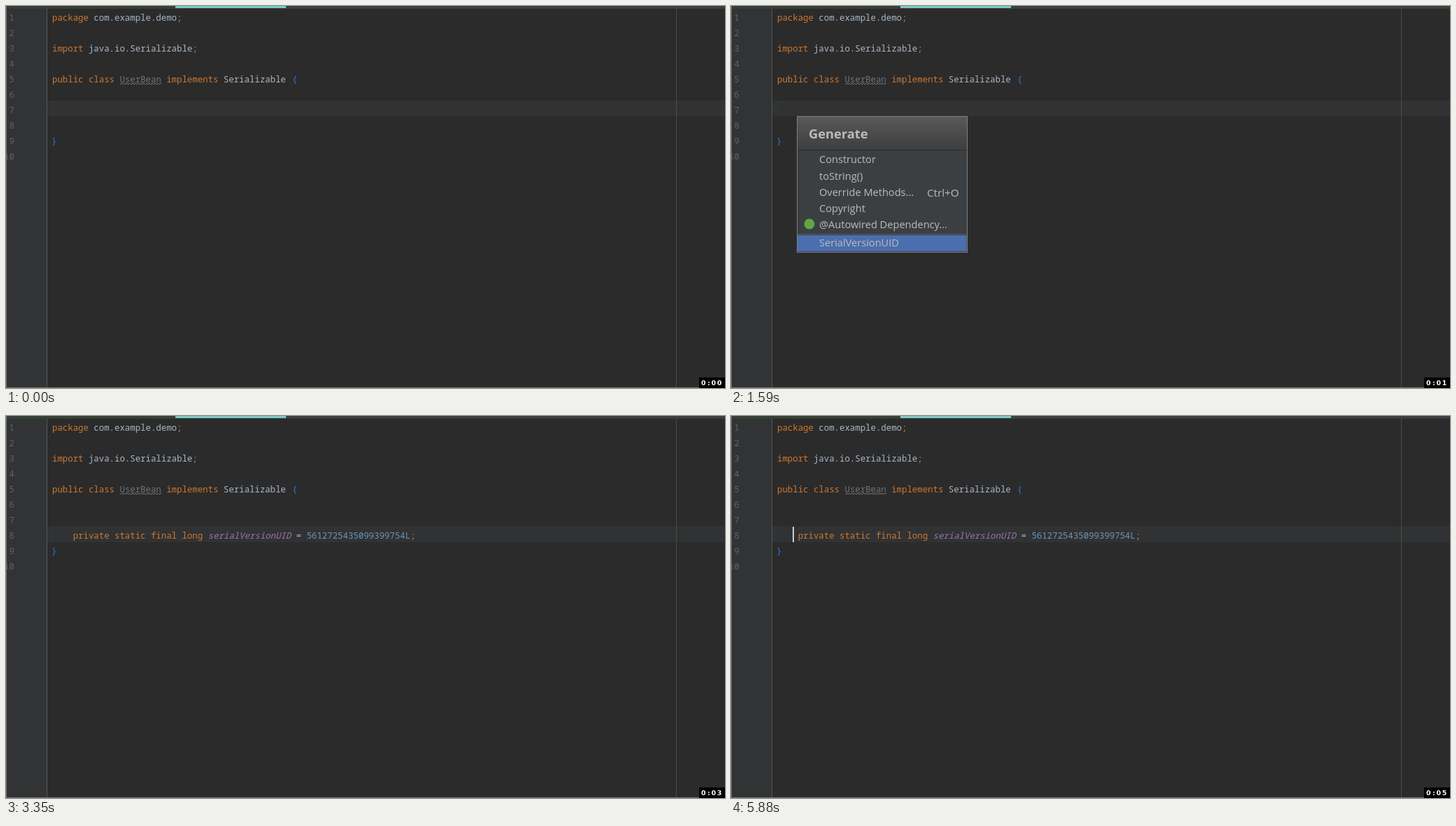
An HTML page that plays this animation: 1027x545 px, repeating every 5940 ms.

```html
<!DOCTYPE html>
<html lang="en">
<head>
<meta charset="utf-8">
<title>Generate a serial ID</title>
<style>
  html, body { margin: 0; width: 100%; height: 100%; overflow: hidden; background: #2b2b2b; }
  svg { display: block; }

  .code text { font: 300 12.36px "Noto Sans Mono", "Liberation Mono", monospace; white-space: pre; fill: #a9b7c6; }
  .code .nums text { fill: #606366; text-anchor: end; }
  .code .key { fill: #cc7832; }
  .code .num { fill: #6897bb; }
  .code .brace { fill: #287bde; }
  .code .unused { fill: #72737a; }
  .code .field { fill: #9876aa; font-style: italic; }

  .menu text { font: 14.6px "Open Sans", "Noto Sans", sans-serif; fill: #bbb; }
  .menu .title { font-weight: 700; font-size: 18.3px; }
  .menu .keys { font-size: 15.2px; }
  .clock text { font: 700 9.4px "DejaVu Sans", sans-serif; fill: #fff; }

  .anim { animation: 5940ms step-end infinite; }
  .before { animation-name: before; }
  .after { animation-name: after; }
  .plain { animation-name: plain; }
  .styled { animation-name: styled; }
  .caret7 { animation-name: caret7; }
  .caret8 { animation-name: caret8; }
  .popup { animation-name: popup; }
  .pick { animation-name: pick; }
  .seconds { animation-name: seconds; }
  .pointer { animation-name: pointer, glide; }

  @keyframes before { 0% { visibility: visible } 39.730%, 100% { visibility: hidden } }
  @keyframes after { 0% { visibility: hidden } 39.730%, 100% { visibility: visible } }
  @keyframes plain { 0%, 44.949%, 100% { visibility: hidden } 39.730% { visibility: visible } }
  @keyframes styled { 0% { visibility: hidden } 44.949%, 100% { visibility: visible } }
  @keyframes caret7 { 0%, 14.141%, 100% { visibility: hidden } 5.218% { visibility: visible } }
  @keyframes caret8 {
    0%, 56.397%, 75.084%, 91.750% { visibility: hidden }
    39.730%, 65.656%, 82.996%, 98.989%, 100% { visibility: visible }
  }
  @keyframes popup { 0%, 39.730%, 100% { visibility: hidden } 15.656% { visibility: visible } }
  @keyframes pick { 0% { transform: none } 26.767%, 100% { transform: translateY(119px) } }
  @keyframes seconds {
    0% { transform: none }
    17.340% { transform: translateY(-20px) }
    34.175% { transform: translateY(-40px) }
    50.673% { transform: translateY(-60px) }
    68.350% { transform: translateY(-80px) }
    86.026%, 100% { transform: translateY(-100px) }
  }
  @keyframes pointer { 0%, 76.599%, 100% { visibility: hidden } 65.656% { visibility: visible } }
  @keyframes glide {
    0% { transform: translate(540px, 58px) }
    65.656% { transform: translate(540px, 58px); animation-timing-function: steps(6) }
    73.737% { transform: translate(848px, 459px) }
    75.084%, 100% { transform: translate(895px, 520px) }
  }
</style>
</head>
<body>
<svg width="1027" height="545" viewBox="0 0 1027 545">
  <defs>
    <linearGradient id="head" x2="0" y2="1">
      <stop stop-color="#595959"/>
      <stop offset="1" stop-color="#3d3e3f"/>
    </linearGradient>
    <pattern id="wave" x="163" y="109" width="4" height="4" patternUnits="userSpaceOnUse">
      <path d="M-1 3.5L0 3L2 1L4 3L5 3.5" fill="none" stroke="#808080" stroke-width=".9"/>
    </pattern>
  </defs>

  <!-- editor -->
  <rect width="1027" height="545" fill="#2b2b2b"/>
  <rect width="58" height="545" fill="#313335"/>
  <rect class="anim before" x="59" y="135" width="968" height="22" fill="#313233"/>
  <rect class="anim before" x="66" y="135" width="1" height="22" fill="#393939"/>
  <rect class="anim after" x="59" y="157" width="968" height="23" fill="#313233"/>
  <rect x="58" width="1" height="545" fill="#555758"/>
  <rect x="957" width="1" height="545" fill="#4b4b4b"/>
  <rect width="1027" height="4" fill="#3c3f41"/>
  <rect width="242" height="4" fill="#364036"/>
  <rect x="242" width="158" height="3" fill="#7ccbc2"/>
  <rect width="1" height="545" fill="#777"/>
  <rect y="544" width="1027" height="1" fill="#777"/>

  <g class="code">
    <g class="nums" id="nums"></g>
    <text x="66" y="21"><tspan class="key">package</tspan> com.example.demo<tspan class="key">;</tspan></text>
    <text x="66" y="65"><tspan class="key">import</tspan> java.io.Serializable<tspan class="key">;</tspan></text>
    <text x="66" y="109"><tspan class="key">public class</tspan> <tspan class="unused">UserBean</tspan> <tspan class="key">implements</tspan> Serializable <tspan class="brace" dx="1.5">{</tspan></text>
    <rect x="163" y="109" width="59" height="4" fill="url(#wave)"/>
    <g class="anim after">
      <text x="66" y="175">    <tspan class="key">private static final long</tspan></text>
      <text x="66" y="175">                                               = <tspan class="num">5612725435099399754L</tspan><tspan class="key">;</tspan></text>
    </g>
    <text class="anim plain" x="288.5" y="175">serialVersionUID</text>
    <text class="anim styled field" x="288.5" y="175">serialVersionUID</text>
    <text x="65" y="196.5"><tspan class="brace">}</tspan></text>
  </g>

  <rect class="anim caret7" x="95" y="135" width="2" height="23" fill="#ccc"/>
  <rect class="anim caret8" x="88" y="158" width="2" height="22" fill="#ccc"/>

  <!-- popup menu -->
  <g class="menu anim popup">
    <rect x="94.5" y="157.5" width="243" height="194" fill="#3c3f41" stroke="#7b7d7f"/>
    <rect x="95" y="158" width="242" height="47" fill="url(#head)"/>
    <rect x="95" y="205" width="242" height="1" fill="#2a2b2c"/>
    <rect x="95" y="325" width="242" height="1" fill="#55585a"/>
    <rect class="anim pick" x="95" y="208" width="241.5" height="23" fill="#4b6eaf"/>
    <circle cx="112" cy="311" r="7.5" fill="#5fa83f"/>
    <text class="title" x="111" y="188.5">Generate</text>
    <text x="126" y="224">Constructor</text>
    <text x="126" y="247.5">toString()</text>
    <text x="126" y="270.5">Override Methods...</text>
    <text class="keys" x="280" y="271.5">Ctrl+O</text>
    <text x="126" y="294">Copyright</text>
    <text x="126" y="317">@Autowired Dependency...</text>
    <text x="126" y="343">SerialVersionUID</text>
  </g>

  <!-- I-beam pointer -->
  <path class="anim pointer" d="M-3 -6.5H4M-3 7.5H4M.5 -6.5V7.5" fill="none" stroke="#d0d0d0"/>

  <!-- clock -->
  <svg class="clock" x="990" y="530" width="37" height="15" overflow="hidden">
    <rect width="37" height="15"/>
    <text x="3 12 17.5" y="10.6">0:0</text>
    <g class="anim seconds" id="seconds"></g>
  </svg>
</svg>
<script>
  const addText = (id, x, y, label) => {
    const el = document.createElementNS("http://www.w3.org/2000/svg", "text");
    el.setAttribute("x", x);
    el.setAttribute("y", y);
    el.textContent = label;
    document.getElementById(id).append(el);
  };
  for (let i = 0; i < 10; i++) addText("nums", 12, 21 + i * 21.95, i + 1);
  for (let s = 0; s < 6; s++) addText("seconds", 25.7, 10.6 + s * 20, s);
</script>
</body>
</html>
```
